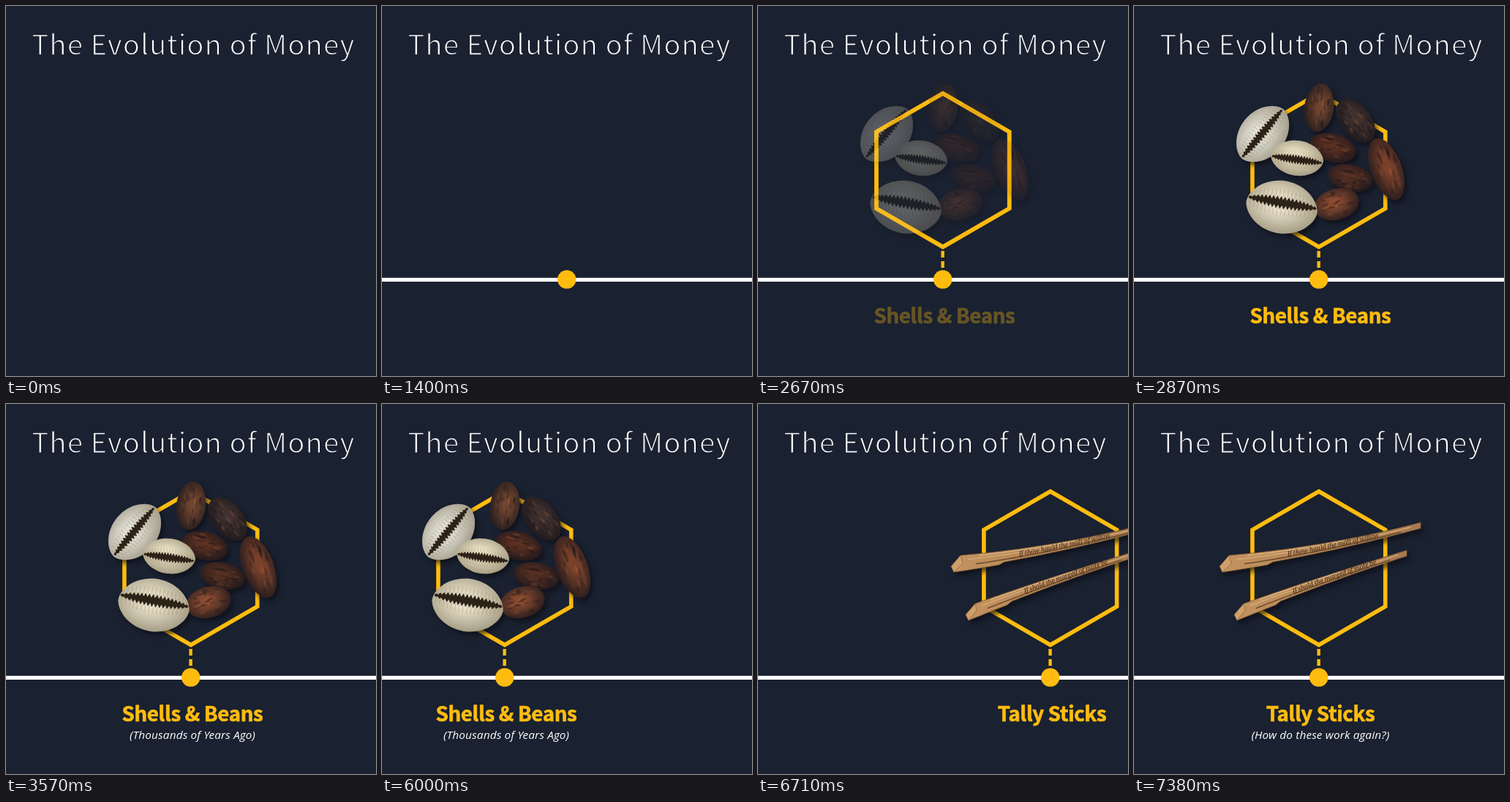
These frames come from a looping animation (506 px wide and 506 px high, 8000 ms). An HTML page:

```html
<!DOCTYPE html>
<html lang="en">
<head>
<meta charset="utf-8">
<title>The Evolution of Money</title>
<style>
html, body { margin: 0; width: 100%; height: 100%; overflow: hidden; background: #1a2130; }
svg { display: block; width: 100vw; height: 100vh; }
text { text-anchor: middle; white-space: pre; }
.title, .label { font-family: "Noto Sans CJK JP", "Noto Sans CJK SC", "Noto Sans CJK KR", "Open Sans", sans-serif; }
.title { font-weight: 300; font-size: 37.3px; letter-spacing: 1.89px; fill: #fff; }
/* Used when the light weight is missing: trims the regular strokes. */
.title.trim { font-weight: 400; font-size: 38.4px; letter-spacing: 1.02px; stroke: #1a2130; stroke-width: 1.3px; }
.label { font-weight: 700; font-size: 27.6px; letter-spacing: -.3px; fill: #ffbc0f; stroke: #ffbc0f; stroke-width: .7px; }
.note { font: italic 400 15.3px "Open Sans", "Noto Sans", sans-serif; letter-spacing: .18px; fill: #fff; }
.ink { font: italic 400 9px "Noto Serif", serif; letter-spacing: -.2px; fill: #3b2412; text-anchor: start; }
.shadow { filter: drop-shadow(4px 5px 3px rgba(9, 12, 20, .65)); }
.soft { filter: blur(.7px); }
</style>
</head>
<body>
<svg id="stage" viewBox="0 0 506 506" xmlns="http://www.w3.org/2000/svg"></svg>
<script>
const LOOP = 8000, GOLD = '#ffbc0f', TAU = Math.PI * 2;
const stage = document.getElementById('stage');

let seed = 7;
const rnd = () => (seed = seed * 16807 % 2147483647) / 2147483647;
const span = (a, b) => a + rnd() * (b - a);
const list = (n, f) => Array.from({ length: n }, (_, i) => f(i));
const poly = pts => pts.map(p => p.map(v => v.toFixed(1))).join(' ');
const place = (x, y, turn, inner) => `<g transform="translate(${x} ${y}) rotate(${turn})">${inner}</g>`;

// Closed outline whose half height at u (-1 to 1) is given by rise(u, i).
function lens(n, rx, rise) {
  const edge = side => list(n + 1, i => {
    const u = 2 * i / n - 1;
    return [u * rx, side * rise(u, i)];
  });
  return poly([...edge(-1), ...edge(1).reverse()]);
}

// Pale oval with slightly pointed ends, faint ridges and a jagged slit.
function shell(x, y, rx, ry, turn, color, lift, gap) {
  const body = poly(list(60, i => {
    const a = i / 60 * TAU, s = Math.sin(a);
    return [rx * Math.cos(a), ry * Math.sign(s) * Math.abs(s) ** 1.15];
  }));
  const ridges = list(17, i => {
    const u = (i - 8) / 9, h = ry * .5 * Math.sqrt(1 - u * u);
    return `M${u * rx},${lift - h}v${2 * h}`;
  }).join('');
  const slit = lens(36, rx * .97, (u, i) => gap * (1 - u * u) ** .6 * (i % 2 ? 1 : .4));
  return place(x, y, turn,
    `<polygon points="${body}" fill="${color}"/><polygon points="${body}" fill="url(#pale)"/>
     <path d="${ridges}" stroke="#8d7d58" stroke-width="1.4" opacity=".3" class="soft"/>
     <polygon points="${slit}" fill="#2c2217" transform="translate(0 ${lift})"/>`);
}

// Dark oval with a warm core and blotches along its axis.
function bean(x, y, rx, ry, turn, core) {
  const oval = fill => `<ellipse rx="${rx}" ry="${ry}" fill="${fill}"/>`;
  const spots = list(26, i => {
    const a = span(0, TAU), r = Math.sqrt(rnd()) * .8;
    return `<ellipse cx="${r * rx * Math.cos(a)}" cy="${r * ry * Math.sin(a)}" rx="${rx * span(.08, .2)}"
      ry="${ry * span(.04, .1)}" fill="${i % 3 ? '#1c1416' : '#b5683f'}" opacity="${span(.25, .5)}"/>`;
  }).join('');
  return place(x, y, turn, oval(core) + `<g class="soft">${spots}</g>` + oval('url(#dark)'));
}

// Tapered stick along a bent spine; the head is thicker below up to a notch.
function stick(id, [x0, y0], [x1, y1], sag, words) {
  const at = (u, v) => {
    const h = 4 + 6 * (1 - u) ** 1.5 + (v > .9 && u < .24 ? 3 : 0);
    const off = v * h;
    return [x0 + (x1 - x0) * u - off * .4 * (1 - u), y0 + (y1 - y0) * u + sag * 4 * u * (1 - u) + off];
  };
  const run = (v, a, b) => list(41, i => at(a + (b - a) * i / 40, v));
  const grain = (v, a, b, color) =>
    `<polyline points="${poly(run(v, a, b))}" fill="none" stroke="${color}" stroke-width="1.3"/>`;
  return `<polygon points="${poly([...run(-1, 0, 1), ...run(1, 1, 0)])}" fill="url(#wood)" stroke="#7c5531" stroke-width=".8"/>
    <polygon points="${poly([at(0, -1), [x0 - 9, y0 + 5], at(0, 1), at(.03, .2)])}" fill="#cfa06c" stroke="#8a6038" stroke-width=".7"/>
    ${grain(-.3, .05, .95, '#d9ad78')}${grain(.55, .1, .9, '#5d3f24')}${grain(-.75, .1, .6, '#dcb584')}
    <path id="${id}" d="M${poly(run(.4, .32, .9))}" fill="none"/>
    <text class="ink"><textPath href="#${id}">${words}</textPath></text>`;
}

const corners = list(6, i => [252.8 + 105 * Math.sin(i * TAU / 6), 224.5 - 105 * Math.cos(i * TAU / 6)]);
const hex = `<polygon points="${poly(corners)}" fill="none" stroke="${GOLD}" stroke-width="5.6"/>`;

const group = (id, art, label, note) => `<g id="${id}">
  <circle class="dot" cx="252.7" cy="373.9" r="12.7" fill="${GOLD}"/>
  <path class="dash" d="M252.6,335v23.5" stroke="${GOLD}" stroke-width="4.4" stroke-dasharray="9 5"/>
  <g class="hex">${hex}</g>
  <g class="art"><g class="shadow">${art}</g></g>
  <g class="over">${hex}</g>
  <text class="label" x="255" y="433.5">${label}</text>
  <text class="note" x="255" y="458">${note}</text></g>`;

const finds =
  bean(253, 139, 33, 20, 98, '#70452f') +
  bean(303, 157, 34, 21, 52, '#42322f') +
  bean(272, 194, 32, 19, 14, '#5c2f22') +
  bean(296, 235, 31, 18, 12, '#573023') +
  bean(345, 223, 44, 21, 70, '#7a412a') +
  bean(277, 271, 31, 21, -15, '#87492f') +
  shell(176, 175, 44, 31, -50, '#e6e4db', -1, 7) +
  shell(223, 208, 36, 24, 8, '#ebe3c8', 2, 7) +
  shell(202, 275, 49, 36, 10, '#ebe3cd', -6, 9);

const sticks =
  stick('ink1', [126, 217], [392, 166], 5, 'If thow hauld the malt of willow') +
  stick('ink2', [146, 283], [373, 204], -2, 'If shold the marged of mote be');

const fadeTo = (id, color, edge) => `<radialGradient id="${id}" cx=".46" cy=".44" r=".6">
  <stop offset=".2" stop-color="${color}" stop-opacity="0"/>
  <stop offset="1" stop-color="${color}" stop-opacity="${edge}"/></radialGradient>`;

stage.innerHTML = `<defs>${fadeTo('pale', '#6f664c', .6)}${fadeTo('dark', '#17141a', .85)}
  <linearGradient id="wood"><stop stop-color="#c3925f"/><stop offset="1" stop-color="#a67a50"/></linearGradient></defs>
<rect width="506" height="506" fill="#1a2130"/>
<text class="title" x="256.4" y="66.5">The Evolution of Money</text>
<path id="line" d="M0,374.3H506" stroke="#fff" stroke-width="5.2"/>
${group('first', finds, 'Shells &amp; Beans', '(Thousands of Years Ago)')}
${group('second', sticks, 'Tally Sticks', '(How do these work again?)')}`;

// Check whether a light weight is installed.
const title = stage.querySelector('.title');
const lightWidth = title.getComputedTextLength();
title.style.fontWeight = 400;
const plainWidth = title.getComputedTextLength();
title.style.fontWeight = '';
if (Math.abs(lightWidth - plainWidth) < 1) title.classList.add('trim');

// Value of the last step reached.
const step = (t, steps) => steps.reduce((v, [at, x]) => t >= at ? x : v, 0);
const show = (el, on) => el.setAttribute('opacity', +on);

function pose(id, x, visible, look) {
  const g = document.getElementById(id);
  g.setAttribute('transform', `translate(${x} 0)`);
  show(g, visible);
  for (const key in look) show(g.querySelector('.' + key), look[key]);
}

function draw(t) {
  const fade = Math.max(0, Math.min(3, Math.floor((t - 2570) / 100))) / 3;
  show(document.getElementById('line'), t >= 500);
  pose('first', step(t, [[6000, -85], [6170, -252]]), t < 6340, {
    dot: t >= 1400, dash: t >= 2070, hex: t >= 2370,
    art: fade, over: fade && 1 - fade, label: fade, note: t >= 3570
  });
  pose('second', step(t, [[6540, 343], [6710, 147], [6910, 0]]), t >= 6540, { over: 0, note: t >= 7380 });
}

function tick() {
  draw(performance.now() % LOOP);
  requestAnimationFrame(tick);
}
tick();
</script>
</body>
</html>
```
